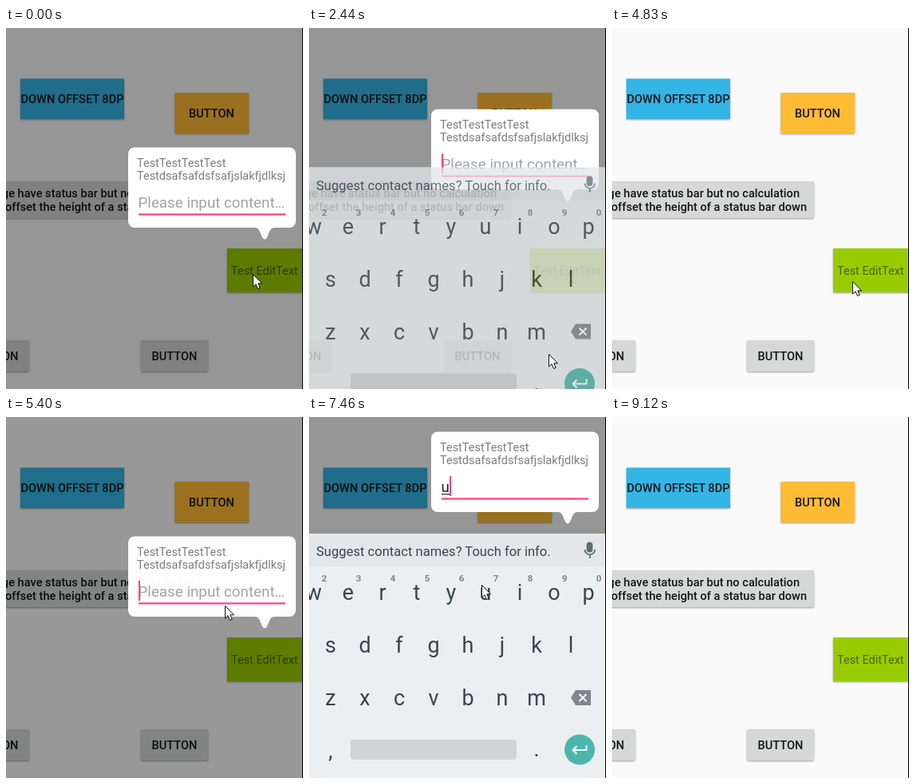
Animation of 372x452 px, one loop 9670 ms. Source, as an HTML page:

```html
<!DOCTYPE html>
<html lang="en">
<head>
<meta charset="utf-8">
<title>Popup with text field</title>
<style>
  html, body { margin: 0; width: 100%; height: 100%; overflow: hidden; background: #fafafa; }
  svg { display: block; width: 372px; height: 452px; font-family: Roboto, sans-serif; }
  .label { font-size: 14.6px; font-weight: 500; fill: #161616; }
  .mid { text-anchor: middle; }
  .end { text-anchor: end; }
  .raised { filter: drop-shadow(0 1px 1px rgba(0, 0, 0, .38)); }
  .title { font-size: 14.5px; fill: #7d7d7d; }
  .field { font-size: 18.8px; }
  .key { font-size: 27px; fill: #37474f; text-anchor: middle; }
  .digit { font-size: 11.5px; font-weight: 700; fill: #7b878d; text-anchor: middle; }
</style>
</head>
<body>
<svg viewBox="0 0 372 452" xmlns="http://www.w3.org/2000/svg">
  <rect width="372" height="452" fill="#fafafa"/>
  <g class="raised">
    <rect x="18" y="63.5" width="130" height="50.5" fill="#33b5e5"/>
    <rect x="211.5" y="81" width="92.5" height="51" fill="#ffbb33"/>
    <rect x="277" y="276" width="95" height="55" fill="#99cc00"/>
    <g fill="#d6d7d7">
      <rect x="-60" y="192" width="313" height="46" rx="2"/>
      <rect x="-55" y="391" width="84" height="39" rx="2"/>
      <rect x="169" y="391" width="84" height="39" rx="2"/>
    </g>
  </g>
  <g class="label">
    <text class="mid" x="83" y="94">DOWN OFFSET 8DP</text>
    <text class="mid" x="257.5" y="112">BUTTON</text>
    <text class="end" x="235" y="212">ge have status bar but no calculation</text>
    <text class="end" x="244" y="229">offset the height of a status bar down</text>
    <text class="mid" x="-13" y="416">BUTTON</text>
    <text class="mid" x="211" y="416">BUTTON</text>
  </g>
  <text x="282" y="309" font-size="14.5" fill="#4a6300">Test EditText</text>

  <g id="overlay">
    <rect width="372" height="452" opacity=".4"/>
    <g id="dialog">
      <path fill="#fff" d="M161 149.500H355a8 8 0 0 1 8 8V242a8 8 0 0 1-8 8H336C331 250.500 330 255 328 260Q324 269 320 260C318 255 317 250.500 312 250H161a8 8 0 0 1-8-8V157.500a8 8 0 0 1 8-8Z"/>
      <text class="title" x="164" y="173.500">TestTestTestTest</text>
      <text class="title" x="164" y="190">Testdsafsafdsfsafjslakfjdlksj</text>
      <text id="hint" class="field" x="165.500" y="225" fill="#a3a3a3">Please input content…</text>
      <g id="typed">
        <text class="field" x="165.500" y="225" fill="#222">u</text>
        <rect x="166" y="227" width="10" height="1.300" fill="#333"/>
      </g>
      <rect x="166" y="232.300" width="184" height="2.200" fill="#ff4081"/>
      <rect id="caret" y="205" width="2" height="25" fill="#ff4081"/>
    </g>
  </g>

  <g id="keyboard">
    <rect y="146" width="372" height="310" fill="#eceff1"/>
    <rect y="146" width="372" height="41" fill="#e3e7e9"/>
    <text x="9" y="174" font-size="16.600" fill="#37474f">Suggest contact names? Touch for info.</text>
    <g fill="none" stroke="#5f6c72" stroke-width="1.800">
      <rect x="348.500" y="157.500" width="6" height="11" rx="3" fill="#5f6c72"/>
      <path d="M345.500 166a6.300 6.300 0 0 0 12.600 0M351.800 172.500V177"/>
    </g>
    <g id="keys"></g>
    <path d="M328 351.500L334 342H353V361H334Z" fill="#7d888d"/>
    <path d="M338.500 347l9 9m0-9l-9 9" stroke="#fff" stroke-width="2"/>
    <rect x="52" y="404" width="208" height="25" rx="4" fill="#d0d4d7"/>
    <circle cx="339" cy="416.500" r="19" fill="#4db6ac"/>
    <path d="M347.500 411V417H331M335.500 412l-5 5 5 5" fill="none" stroke="#fff" stroke-width="2"/>
  </g>

  <rect x="371" width="1" height="452"/>
  <path id="pointer" d="M.5.500V16L4 12.700 6.500 18.500 9.200 17.300 6.800 11.800H11.500Z" fill="#fff" stroke="#111"/>
</svg>
<script>
const LOOP = 9670;
const GLIDE = 240;
const $ = id => document.getElementById(id);

function addRow(chars, x, y, cls = 'key') {
  [...chars].forEach((char, i) => {
    const node = document.createElementNS('http://www.w3.org/2000/svg', 'text');
    node.setAttribute('class', cls);
    node.setAttribute('x', x + i * 43);
    node.setAttribute('y', y);
    node.textContent = char;
    $('keys').append(node);
  });
}
addRow('wertyuiop', 6, 229);
addRow('234567890', 19, 206, 'digit');
addRow('sdfghjkl', 27, 295);
addRow('zxcvbnm', 27, 361);
addRow(',', 27, 427);
addRow('.', 285, 425);

// Each round: popup opens, keyboard rises, field is used, popup closes.
const rounds = [
  { open: -800, keys: 2300, input: 3010, close: 3810 },
  { open: 4980, keys: 6810, input: 7330, erase: 8060, close: 8520 }
];

// Pointer stops: time the glide begins, then where it ends.
const stops = [
  [-GLIDE, 309, 308], [200, 266, 217], [1220, 300, 408], [2920, 261, 115],
  [3400, 74, 42], [4200, 301, 317], [5150, 274, 236], [5600, 254, 215],
  [6250, 324, 389], [7030, 216, 210], [7810, 352, 340], [8100, 32, 19],
  [8850, -20, -24]
];

const ramp = (t, start, length) => Math.min(1, Math.max(0, (t - start) / length));
const smooth = p => p * p * (3 - 2 * p);
const easeOut = p => 1 - (1 - p) ** 2;
const mix = (a, b, p) => a + (b - a) * p;
const move = (id, x, y) => $(id).setAttribute('transform', `translate(${x} ${y})`);
const fade = (id, alpha) => $(id).setAttribute('opacity', Number(alpha));

function drawPopup(t, { open, keys, input, erase = input, close }) {
  const typed = t >= input && t < erase;
  const leave = ramp(t, close + 300, 280);
  const lastEvent = [open, input, erase].filter(time => time <= t).at(-1);

  fade('overlay', ramp(t, open, 430) * (1 - ramp(t, close, 330)));
  move('dialog', 0, -131 * smooth(ramp(t, keys, 345)));
  move('keyboard', 0, 96 * (1 - easeOut(ramp(t, keys, 310)) + leave));
  fade('keyboard', ramp(t, keys, 187) * (1 - leave));
  fade('typed', typed);
  fade('hint', !typed);
  fade('caret', (t - lastEvent) % 1000 < 500);
  move('caret', typed ? 176 : 166, 0);
}

function drawPointer(t) {
  const i = stops.findLastIndex(([start]) => start <= t);
  const [start, x, y] = stops[i];
  const [, fromX, fromY] = stops[Math.max(0, i - 1)];
  const p = ramp(t, start, GLIDE);
  move('pointer', mix(fromX, x, p), mix(fromY, y, p));
}

function draw() {
  const t = performance.now() % LOOP;
  drawPopup(t, rounds.findLast(({ open }) => open <= t));
  drawPointer(t);
  requestAnimationFrame(draw);
}
draw();
</script>
</body>
</html>
```
